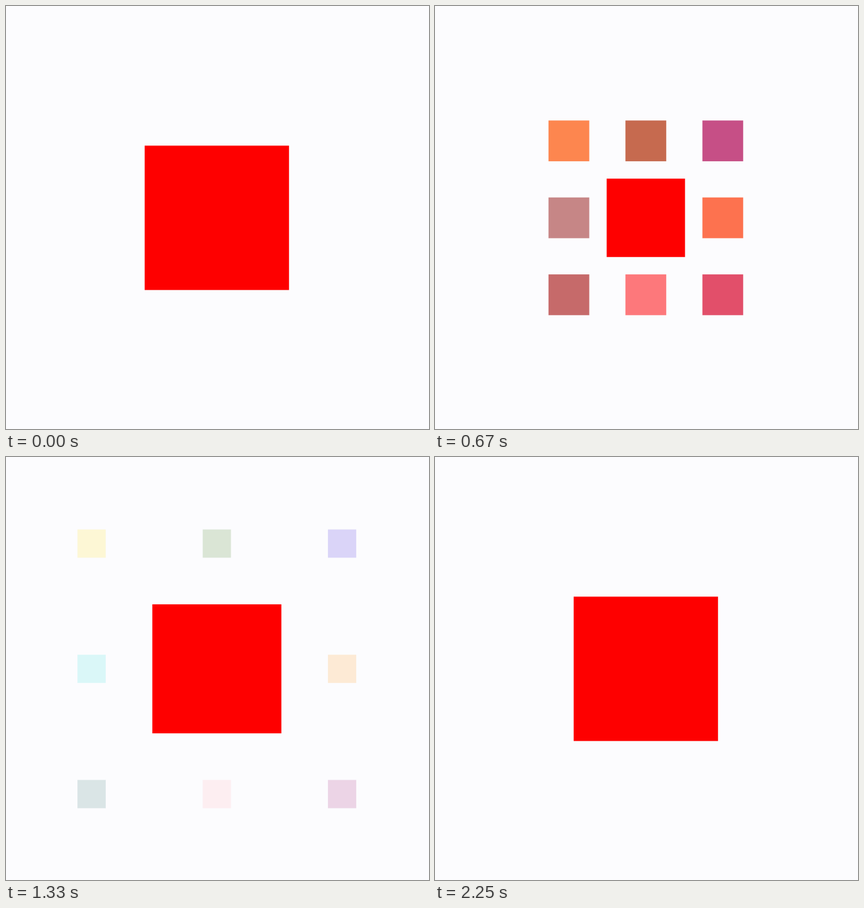
These frames come from a looping animation (640 by 640 pixels, 2330 ms). An HTML page with a canvas:

```html
<!DOCTYPE html>
<html lang="en">
<head>
<meta charset="utf-8">
<title>Square split</title>
<style>
  html, body { margin: 0; width: 100%; height: 100%; overflow: hidden; background: #fcfcfe; }
  canvas { display: block; width: 640px; height: 640px; }
</style>
</head>
<body>
<canvas id="stage" width="640" height="640"></canvas>
<script>
const ctx = document.getElementById('stage').getContext('2d');
const LOOP = 2330, START = 250, DURATION = 2000, FPS = 12;
const CX = 319, CY = 320.5, FULL = 218.4;
const BG = '#fcfcfe', RED = [254, 0, 0];

// Column, row and the colour each tile turns into while it fades out.
const TILES = [
  [-1, -1, [255, 255, 0]],
  [ 0, -1, [0, 128, 0]],
  [ 1, -1, [0, 0, 255]],
  [-1,  0, [0, 255, 255]],
  [ 1,  0, [255, 165, 0]],
  [-1,  1, [0, 128, 128]],
  [ 0,  1, [255, 192, 203]],
  [ 1,  1, [128, 0, 128]]
];

const mix = (a, b, k) => a + (b - a) * k;
const bezier = (a, b, s) => 3 * (1 - s) ** 2 * s * a + 3 * (1 - s) * s * s * b + s ** 3;

// cubic-bezier(.25, .1, .25, 1)
function ease(x) {
  if (x <= 0) return 0;
  if (x >= 1) return 1;
  let lo = 0, hi = 1;
  for (let i = 0; i < 30; i++) {
    const s = (lo + hi) / 2;
    if (bezier(0.25, 0.25, s) < x) lo = s; else hi = s;
  }
  return bezier(0.1, 1, lo);
}

function square(x, y, size, rgb, alpha = 1) {
  ctx.fillStyle = `rgba(${rgb.map(Math.round)},${alpha})`;
  ctx.fillRect(x - size / 2, y - size / 2, size, size);
}

function draw(ms) {
  // Poses are held at 12 per second, on a 10 ms clock.
  const tick = Math.floor((ms % LOOP) / 10);
  const step = Math.floor((tick + 0.5) * FPS / 100);
  const p = ease((step * 1000 / FPS - START) / DURATION);

  ctx.fillStyle = BG;
  ctx.fillRect(0, 0, 640, 640);
  if (p < 1e-6) {
    square(CX, CY, FULL, RED);
    return;
  }
  const gap = mix(FULL / 3, 211.6, p), size = mix(73, 37, p);
  for (const [col, row, tone] of TILES) {
    const rgb = RED.map((c, i) => mix(c, tone[i], p));
    square(CX + col * gap, CY + row * gap, size, rgb, (1 - p).toFixed(4));
  }
  square(CX, CY, mix(FULL / 3, FULL, p), RED);
}

const begin = performance.now();
function loop() {
  draw(performance.now() - begin);
  requestAnimationFrame(loop);
}
loop();
</script>
</body>
</html>
```
